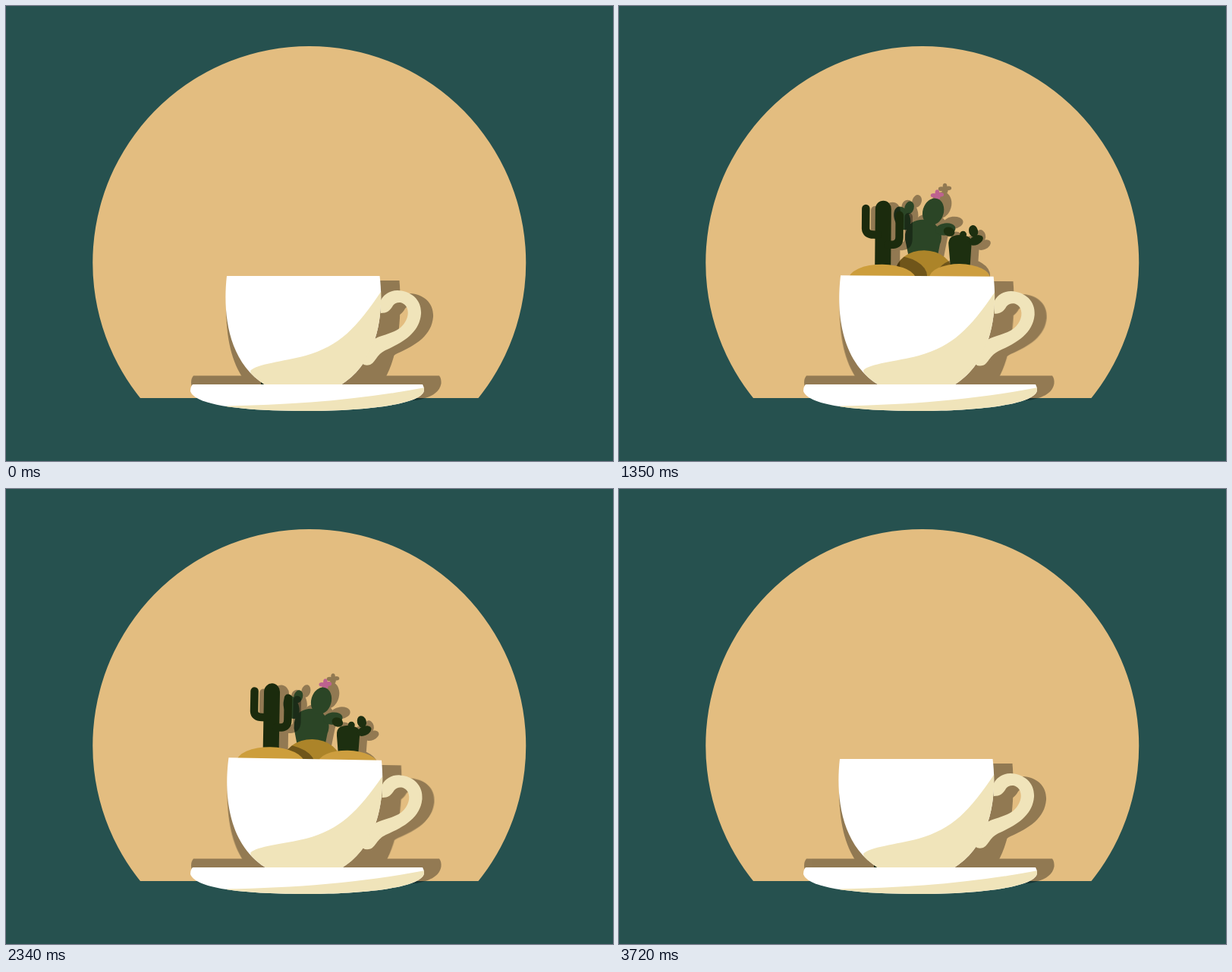
These frames come from a looping animation (800x600 px, 3750 ms). An HTML page:

```html
<!DOCTYPE html>
<html lang="en">
<head>
<meta charset="utf-8">
<title>Cactus cup</title>
<style>
  html, body { margin: 0; width: 100%; height: 100%; overflow: hidden; background: #26514f; }
  svg { display: block; width: 800px; height: 600px; }
  .shape { fill: currentColor; }
  .arm { fill: none; stroke: currentColor; stroke-width: 10.5; stroke-linecap: round; stroke-linejoin: round; }
  .shade { color: #000; opacity: .355; }
  .steam { fill: none; stroke: #fff; stroke-width: 7; stroke-linecap: round; }
</style>
</head>
<body>
<svg viewBox="0 0 800 600">
  <defs>
    <path id="cup" d="M291 356H492.5C498 400 493 468 441 500V512H342V500C290 468 286 400 291 356Z"/>
    <path id="handle" d="M494 388C498 380 506 375 516 375C535 376 548 388 547 406C545 430 525 443 500 454C488 460 487 470 480 473Q474 475 470 472L486 439C494 434 510 432 520 424C529 416 532 405 528 397C523 389 514 390 510 395C506 402 502 405 494 405Z"/>
    <path id="plate" d="M246 499H549Q551 502 551 507C548 526 470 534 397 534C320 534 250 528 243 508Q243 502 246 499Z"/>
    <clipPath id="inCup"><use href="#cup"/></clipPath>
    <clipPath id="inPlate"><use href="#plate"/></clipPath>
    <clipPath id="inMound"><ellipse cx="401" cy="356" rx="38" ry="30"/></clipPath>

    <g id="tall">
      <path class="shape" d="M336 380V268A10.5 11 0 0 1 357 268V380Z"/>
      <path class="arm" d="M323.500 267.500V294Q324 302 334 302H340M353 315H360Q368 314 368 305V276"/>
    </g>
    <g id="pear" class="shape">
      <path d="M384 290Q400 281 414 291Q427 304 421 318L416 345H383L376 312Q375 296 384 290Z"/>
      <ellipse cx="412" cy="275" rx="13.500" ry="18" transform="rotate(15 412 275)"/>
      <ellipse cx="372" cy="284" rx="10" ry="16" transform="rotate(-20 372 284)"/>
      <ellipse cx="381" cy="270" rx="6" ry="8.500" transform="rotate(15 381 270)"/>
      <ellipse cx="428" cy="298" rx="13" ry="8" transform="rotate(-8 428 298)"/>
    </g>
    <g id="flower" class="shape">
      <ellipse cx="417" cy="250" rx="2.800" ry="4"/>
      <ellipse cx="412.500" cy="253.500" rx="4" ry="2.800"/>
      <ellipse cx="421.500" cy="252.500" rx="4" ry="2.800"/>
      <circle cx="417" cy="255.500" r="4"/>
    </g>
    <g id="small" class="shape">
      <path d="M438 310Q448 306 458 310Q465 313 463 322L460 375H438L433 322Q432 313 438 310Z"/>
      <circle cx="452" cy="307.500" r="4.500"/>
      <ellipse cx="433.500" cy="304" rx="7.500" ry="6" transform="rotate(20 433.500 304)"/>
      <ellipse cx="469" cy="315" rx="10" ry="6" transform="rotate(-25 469 315)"/>
      <ellipse cx="465.500" cy="303" rx="6" ry="8" transform="rotate(-15 465.500 303)"/>
    </g>
  </defs>

  <path fill="#e3bd80" d="M177 517A285.500 285.500 0 1 1 622.500 517Z"/>

  <g class="shade">
    <path d="M247 487.500H571Q574 491 573.500 498C571 512 556 517 540 520H300C260 516 244 510 244 497Q244 491 247 487.500Z"/>
    <g class="tilt">
      <path d="M292 362H518.500C522 405 518 460 499 492H313C298 470 290 440 290 395Z"/>
      <use href="#handle" x="16" y="4"/>
    </g>
  </g>

  <g class="tilt">
    <g id="pearShade" class="shade"><use href="#pear"/><use href="#flower"/></g>
    <g id="pearMove"><use href="#flower" color="#bd628f"/><use href="#pear" color="#2b4526"/></g>
    <g id="midMound">
      <ellipse cx="401" cy="356" rx="38" ry="30" fill="#ac8429"/>
      <g clip-path="url(#inMound)"><ellipse class="shade" cx="358" cy="360" rx="47" ry="27"/></g>
    </g>

    <g id="smallShade" class="shade">
      <use href="#small"/>
      <ellipse cx="443" cy="355" rx="35" ry="22"/>
    </g>
    <use id="smallMove" href="#small" color="#1d2f10"/>
    <ellipse id="rightMound" cx="448" cy="361" rx="40" ry="18.500" fill="#cd9e3f"/>

    <use id="tallShade" href="#tall" class="shade"/>
    <use id="tallMove" href="#tall" color="#1b2b0d"/>
    <ellipse id="leftMound" cx="346" cy="362" rx="45" ry="21" fill="#cd9e3c"/>

    <use href="#cup" fill="#fff"/>
    <g fill="#f0e4ba">
      <path clip-path="url(#inCup)" d="M496 374C462 425 440 448 395 461C365 469 330 472 322 481Q322 490 342 515H500Z"/>
      <use href="#handle"/>
    </g>
  </g>

  <use href="#plate" fill="#fff"/>
  <path clip-path="url(#inPlate)" fill="#f0e4ba" d="M290 527.500C380 526 470 519 552 503V540H290Z"/>

  <g class="steam">
    <path pathLength="100" d="M345 321c-14-18 14-37 0-56s14-37 0-55"/>
    <path pathLength="100" d="M391 321c-14-18 14-37 0-56s14-37 0-55"/>
    <path pathLength="100" d="M437 321c-14-18 14-37 0-56s14-37 0-55"/>
  </g>
</svg>
<script>
  const LOOP = 3750, STEP = 30, MIRROR = 1905;
  const $ = id => document.getElementById(id);
  const tilted = document.querySelectorAll('.tilt');
  const steam = document.querySelectorAll('.steam path');
  const sway = [[690, 0], [1110, -1.7], [1480, 1.3], [1900, -2.2], [2380, 1.1],
                [2800, -3.3], [3130, 1.2], [3720, 0]];

  const clamp = x => Math.max(0, Math.min(1, x));

  function angle(t) {
    for (let i = 1; i < sway.length; i++) {
      const [a, from] = sway[i - 1], [b, to] = sway[i];
      if (t >= a && t < b) {
        return from + (to - from) * (1 - Math.cos(Math.PI * (t - a) / (b - a))) / 2;
      }
    }
    return 0;
  }

  // Damped pop from 0 to 1; half is the half period in ms.
  function spring(t, start, half, damp) {
    const x = (t - start) / half;
    return x <= 0 ? 0 : 1 - Math.cos(Math.PI * x) * Math.exp(-damp * x);
  }

  const move = (id, x, y, extra = '') =>
    $(id).setAttribute('transform', `translate(${x} ${y}) ${extra}`);

  function draw(t) {
    const turn = `rotate(${angle(t)} 391 490)`;
    tilted.forEach(g => g.setAttribute('transform', turn));

    // The cacti leave along the way they came.
    const m = t < MIRROR ? t : 2 * MIRROR - t;
    const tall = 1 - spring(m, 720, 178, 1.6);
    const pear = 1 - spring(m, 980, 270, 1.75);
    const small = 1 - spring(m, 1130, 180, 1.7);

    move('tallMove', 0, 120 * tall);
    move('tallShade', 12, 2 + 120 * tall);
    move('leftMound', 0, 30 * tall);

    const squeeze = `translate(396 0) scale(${1 - 0.55 * pear} 1) translate(-396 0)`;
    move('pearMove', 0, 110 * pear, squeeze);
    move('pearShade', 10, -8 + 128 * pear, squeeze);
    move('midMound', 0, 110 * pear);

    move('smallMove', 0, 70 * small);
    move('smallShade', 10, 6 + 70 * small);
    move('rightMound', 0, 30 * small);

    const head = t < 660 ? 73 * clamp((t - 150) / 510) : 73 + 27 * clamp((t - 660) / 210);
    const tail = 100 * clamp((t - 480) / 450) ** 1.5;
    const shown = head - tail;
    steam.forEach(p => {
      p.style.visibility = shown > 0 ? 'visible' : 'hidden';
      p.setAttribute('stroke-dasharray', `${Math.max(shown, 0.01)} 300`);
      p.setAttribute('stroke-dashoffset', -tail);
    });
  }

  const begin = performance.now();
  function tick() {
    const t = (performance.now() - begin) % LOOP;
    draw(Math.floor(t / STEP) * STEP);
    requestAnimationFrame(tick);
  }
  tick();
</script>
</body>
</html>
```
